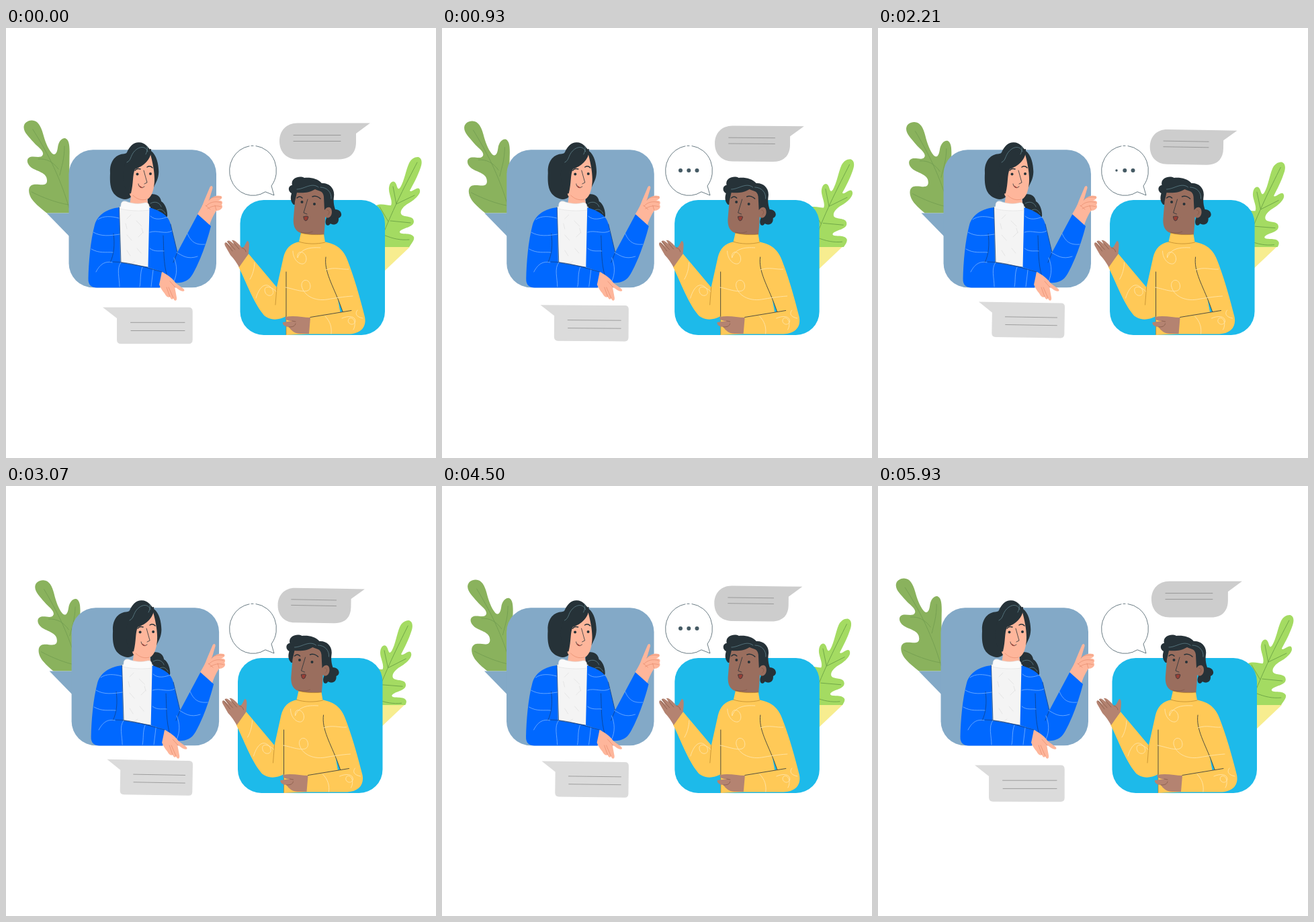
Recreate the animation shown at these times as an HTML page. Size 640 px wide and 640 px high, loop 6 s.

```html
<!DOCTYPE html>
<html lang="en">
<head>
<meta charset="utf-8">
<title>Conversation</title>
<style>
html, body { margin: 0; height: 100%; overflow: hidden; background: #fff }
svg { display: block; width: 100vw; height: 100vh }
path { stroke-linecap: round; stroke-linejoin: round }
.dark { fill: #263238 }
.ink { fill: none; stroke: #263238; stroke-width: .8 }
.brow { stroke-width: 1.5 }
.rule { fill: none; stroke: #808080; stroke-width: .7 }
.pale { fill: #feb69b }
.pinkline { fill: none; stroke: #e58b6d; stroke-width: .7 }
.blue { fill: #0068ff }
.seam { fill: none; stroke: #123d79; stroke-width: .7 }
.wave { fill: none; stroke: #8fbfff; stroke-width: .7 }
.knit { fill: none; stroke: #dedede; stroke-width: .7 }
.hairline { fill: none; stroke: #668c96; stroke-width: .7 }
.face { fill: #9a6e5e }
.palm { fill: #b48371 }
.palmline { fill: none; stroke: #805646; stroke-width: .7 }
.yellow { fill: #ffc957 }
.fold { fill: none; stroke: #a97821; stroke-width: .6 }
.swirl { fill: none; stroke: #ffe5a9; stroke-width: .9 }
.outline { fill: #fff; stroke: #455a64; stroke-width: .8 }
</style>
</head>
<body>
<svg viewBox="0 0 640 640">
<defs>
  <clipPath id="leftCut"><path d="M0 0H200V275.6H0Z"/></clipPath>
  <clipPath id="rightCut"><path d="M500 0H640V326H500Z"/></clipPath>
</defs>

<!-- plants -->
<g clip-path="url(#leftCut)"><g id="leafL">
  <path fill="#8ab25d" d="M38 137.500C47 137 52 146 55 157C58 168 62 179 68 186C73 191 76 186 77 178C78 169 83 163.500 88 164C94 166 95 175 94.500 190L94 230L100 285H72C61 275 50 268 42 259C34 251 31 238 38 234C46 230 60 238 61 228C62 215 47 214 38 208C30 202 30 194 36 192C43 190 53 195 55 188C56 182 47 177 41 170C34 162 26 155 26.500 147C27 141 32 138 38 137.500Z"/>
  <path fill="none" stroke="#719c50" stroke-width=".8" d="M40 151C58 180 78 214 94 268M48 195C60 194 70 199 78 210M87 176C87 195 83 205 80 219M38 244C54 252 74 260 93 263"/>
</g></g>
<g clip-path="url(#rightCut)"><g id="leafR">
  <path fill="#a4db62" d="M613 192C619 193 620 200 617 208C613 220 606 233 601 242C603 246 611 236 615 239C620 246 608 256 599 261C590 266 585 274 589 278C594 282 607 279 607 288C607 297 590 297 586 303C585 309 603 303 607 311C609 317 599 324 596 335H540L545 270C553 257 567 265 573 264C576 257 569 246 570 238C571 228 578 225 581 233C583 240 584 241 587 237C593 227 595 212 600 201C603 195 608 192 613 192Z"/>
  <path fill="none" stroke="#6da346" stroke-width=".9" d="M612 200C595 233 579 262 558 315M576 236L581 262L608 249M556 266L569 288M572 287L602 290M562 308C577 314 587 316 600 315"/>
</g></g>

<!-- woman -->
<g id="woman">
  <path fill="#83a9c7" d="M60.500 275.500H100V316Z"/>
  <rect x="93.500" y="181.200" width="219.500" height="205" rx="36" fill="#83a9c7"/>
  <path class="dark" d="M211 249C222 244 230 250 231 258C237 261 242 274 239.500 284C231 282 215 281 211 270Z"/>
  <path class="hairline" d="M215 261C222 257 229 260 231 266M221 274C228 267 234 270 237 276"/>
  <path class="dark" d="M180 185C184 176 190 170 198 170.300C207 170.500 211 177 216 183C224 189 227 202 227.300 214C227 225 223 230 220 237L190 240C190 253 180 257 172 254C156 249 154 234 155 216C154 201 161 189 174 187.500C177 187 179 187 180 185Z"/>
  <path class="pale" d="M190 210C201 206 212 199 215 188C218 199 221 213 221 225C221 239 217 252 210 255L212 264H184L186 251C181 245 181 218 190 210Z"/>
  <path class="dark" d="M180 187L216 180C217 196 204 206 192 210C188 219 190 230 186 246C180 250 174 232 174 217Z"/>
  <path class="hairline" d="M180 200C188 196 184 188 195 180C203 175 209 178 211 184M210 176C211 180 210 184 208 188"/>
  <path class="ink brow" d="M192 212C194 209 198 209 200 210M210 207C213 205 216 206 218 208"/>
  <path class="ink" d="M205 212L210 230L206 232M197 232C198 238 202 239 206 236"/>
  <path d="M198 234Q199 239 204 238Z" fill="#a1463c"/>
  <g class="dark"><circle cx="195.500" cy="217.500" r="2"/><circle cx="215" cy="217" r="2"/></g>
  <path class="pinkline" d="M189 249C195 255 202 257 209 255"/>
  <path fill="#f4f4f4" d="M168.500 266H215L212.500 357L171 349Z"/>
  <path fill="#fafafa" stroke="#ddd" stroke-width=".6" d="M171 264C171 257 177 257 181 259C190 262 200 262 207 260C213 259 214 265 213 271C199 273 182 272 170 269Z"/>
  <path class="knit" d="M180 284l6-6m8 9l8 8m-22 13l7 8m10-5l7-7m-24 27l5 8m10-11l6 7m-17 17l8-5m10-49l2 7m-26-14l2 8"/>
  <path class="blue" d="M168.500 267C151 269 137 277 132 293C125.500 317 123 350 122.500 373C122 383 128 386.500 135 386.500H229L232 363L211 356L170 349Z"/>
  <path class="blue" d="M213.500 267C225 271 241 276 245 292L255 334L286 276L305 295C299 319 288 349 278 366C272 377 262 380 252 379C243 377 237 371 235 364L211.500 356Z"/>
  <path class="seam" d="M160 306C162 322 161 337 155 349M159 348C184 348 209 357 232 363M234 309C235 330 234 350 240 370M245 292L255 334L249 349M168.500 267L171 349L211 356"/>
  <path class="wave" d="M137 285C145 279 157 280 168 283M130 304C142 311 155 309 169 307M127 329C139 336 149 333 159 334M134 363C141 349 150 347 158 349M171 349C164 358 169 372 169 385M203 356C199 365 201 377 199 385M219 360L216 385M215 280C222 287 233 284 241 281M214 304C225 300 237 308 247 302M214 328C221 334 230 331 235 332M250 342C255 354 255 366 250 377M254 334C263 339 270 345 285 340M270 306C276 320 284 323 296 322"/>
  <path class="pale" d="M285 277C290 269 293 263 295 257L303 238C305 233 309 235 307 240L302 257C306 251 314 248 320 250C324 253 319 256 315 257C320 256 324 258 321 263C324 267 320 272 313 272C309 278 306 284 303 293Z"/>
  <path class="pinkline" d="M302 256C306 251 314 251 320 252M298 265C303 259 312 257 320 260M300 269C307 264 315 264 320 266M297 264L304 270M311 264L313 271"/>
  <path class="pale" d="M232 363C242 368 248 373 253 380L264 388C268 392 263 393 258 390L251 385L254 401C255 407 250 407 249 402C248 405 245 404 244 400C241 402 238 399 236 395C232 391 230 386 228 382Z"/>
  <path class="pinkline" d="M249 402L242 386M244 400L239 386M252 386L244 377"/>
</g>

<!-- man -->
<path id="pot" fill="#f7ed8f" d="M550 326H601L564 361L550 373Z"/>
<g id="man">
  <rect x="348.500" y="256" width="215.500" height="201" rx="35" fill="#1dbaea"/>
  <path class="dark" d="M428 263C422 257 424 250 425 246C418 242 421 234 426 234C423 224 436 219 444 223C453 222 464 224 470 231C480 230 490 238 488 251C487 258 488 264 490 270C500 270 502 281 495 283C496 293 487 294 483 291C478 298 473 291 477 283L470 260Z"/>
  <path class="face" d="M433 245C442 246 452 245 460 240C466 243 472 242 473 251L474 271C478 265 485 265 485 274C485 281 479 285 475 281C475 291 474 300 473 311H438L439 305C429 302 427 292 428 282L430 258Z"/>
  <path class="ink brow" d="M433 253C436 250 439 251 441 253M456 251C460 249 465 251 468 254"/>
  <path class="ink" d="M449 255L443 275L448 277"/>
  <path d="M443 281Q448 279 450 281Q449 287 446 287Q443 286 443 281Z" fill="#973f36" stroke="#263238" stroke-width=".7"/>
  <g class="dark"><circle cx="440.500" cy="259" r="2"/><circle cx="459" cy="262" r="2"/></g>
  <path class="hairline" d="M433 240C444 240 455 229 465 237M468 237C478 237 485 245 484 254"/>
  <path class="palmline" d="M439 304C446 306 452 305 456 303M478 271C482 271 482 276 479 278"/>
  <path class="yellow" d="M438 318C423 320 416 329 413 341L403 386L361 336L346 355C358 380 369 409 382 425C388 434 403 437 417 429V457L450 455.500H509C528 455.500 537 445 534 430C527 402 518 370 508 345C501 326 488 321 473 318Z"/>
  <path class="yellow" d="M439 305C450 308 464 308 473 307L475 319C462 322 447 321 436 318Z"/>
  <path class="fold" d="M439 305C450 308 464 308 473 307M436 318C447 322 463 322 475 319M403 386L401 412"/>
  <path d="M494 404L501 422L497.500 423Z" fill="#1dbaea"/>
  <path class="ink" d="M417 363V429M476 341C473 362 487 384 497 411L501 422M453 430.500L514 420.500"/>
  <path class="fold" d="M417 429V456"/>
  <path class="swirl" d="M427 332C427 350 446 358 447 344C447 332 432 329 434 342C439 328 453 326 468 327M416 386C429 388 453 399 453 384C452 372 439 373 440 384C443 398 459 407 478 404C490 402 501 400 516 399M476 360C489 355 500 360 510 359M363 374C367 368 370 357 370 349M372 402C378 382 388 378 396 388C402 398 390 402 386 394C382 384 392 382 402 392M475 429C483 437 485 446 484 455M500 432C509 428 520 428 520 437C516 446 505 438 511 432C518 429 522 441 517 449M523 420C519 425 521 430 531 432"/>
  <path class="palm" d="M361 336L347 356C343 349 339 343 334 338L326 324C324 319 327 318 330 321L335 326L329 318C331 315 334 317 340 322L336 316C340 315 344 319 351 327C355 327 356 321 359 317C363 317 362 325 361 336Z"/>
  <path class="palmline" d="M328 320L337 332M330 318L341 330M339 320L347 329M351 327C354 328 356 329 357 333"/>
  <path class="palm" d="M453 431L451 455H438C430 455 424 450 421 445C416 445 411 442 412 438L426 436C420 436 414 434 416 430C429 427 442 431 453 431Z"/>
  <path class="palmline" d="M421 445C427 445 430 444 431 440M426 436L431 437"/>
</g>

<!-- speech -->
<g id="bubbleL">
  <path fill="#dbdbdb" d="M144 415.700H272Q277.700 415.700 277.700 421.500V464Q277.700 470 272 470H171Q165 470 165 464V432Z"/>
  <path class="rule" d="M185.500 438.300H266M186 450.500H266"/>
</g>
<g id="bubbleR">
  <path fill="#cdcdcd" d="M434 141.500H542L521 157V170C521 186 512 195.500 495 195.500H434C417 195.500 407 184 407 168.500C407 153 417 141.500 434 141.500Z"/>
  <path class="rule" d="M428 159.500H498M428 168.500H498"/>
</g>
<path class="outline" d="M372 175.500A35 37 0 0 1 395 235L399 249L386 243.800A35 37 0 1 1 362 175.800"/>
<path class="outline" d="M365 175.300H368"/>
<g id="dots" fill="#455a64"><circle cx="355" cy="212"/><circle cx="367.300" cy="212"/><circle cx="379.500" cy="212"/></g>
</svg>
<script>
const $ = id => document.getElementById(id);
const clamp = v => Math.min(1, Math.max(0, v));
const smooth = v => v * v * (3 - 2 * v);
const place = (id, value) => $(id).setAttribute('transform', value);

// Cubic timing curve, solved by bisection
function bezier(x, x1, y1, x2, y2) {
  const at = (s, a, b) => 3 * (1 - s) ** 2 * s * a + 3 * (1 - s) * s * s * b + s ** 3;
  let lo = 0, hi = 1;
  for (let i = 0; i < 24; i++) {
    const mid = (lo + hi) / 2;
    if (at(mid, x1, x2) < x) lo = mid; else hi = mid;
  }
  return at(lo, y1, y2);
}

// Shrink, turn and shift around a bubble's centre
const drift = (e, x, y, dx, dy) =>
  `translate(${x + dx * e} ${y + dy * e}) rotate(${e}) scale(${1 - .045 * e}) translate(${-x} ${-y})`;

function draw(t) {
  const p = t / 3000;
  const sway = bezier(p < 1 ? p : 2 - p, .3, .15, .45, 1);
  const slide = p < 1 ? 1 - (1 - p) ** 3 : 1 - smooth((p - 1) ** 1.25);

  place('woman', `translate(${4.1 * slide} 0)`);
  place('man', `translate(${-3.5 * slide} 0)`);
  place('pot', `translate(${-8 * slide} 0)`);
  place('leafL', `translate(${15.5 * sway} ${3.2 * sway}) rotate(${1.4 * sway} 55 200)`);
  place('leafR', `translate(${-12.5 * sway} ${8.5 * sway}) rotate(${-1.2 * sway} 590 260)`);
  place('bubbleL', drift(sway, 221.5, 443, 2.5, -8.8));
  place('bubbleR', drift(sway, 464, 168.5, -5, 9.5));

  const beat = t % 3000;
  [...$('dots').children].forEach((dot, i) => {
    const grow = smooth(clamp((beat - 150 - 200 * i) / 250));
    const fade = smooth(clamp((beat - 2100 - 200 * i) / 250));
    dot.setAttribute('r', 3 * (grow - fade));
  });
}

const start = performance.now();
(function tick() {
  draw((performance.now() - start) % 6000);
  requestAnimationFrame(tick);
})();
</script>
</body>
</html>
```
